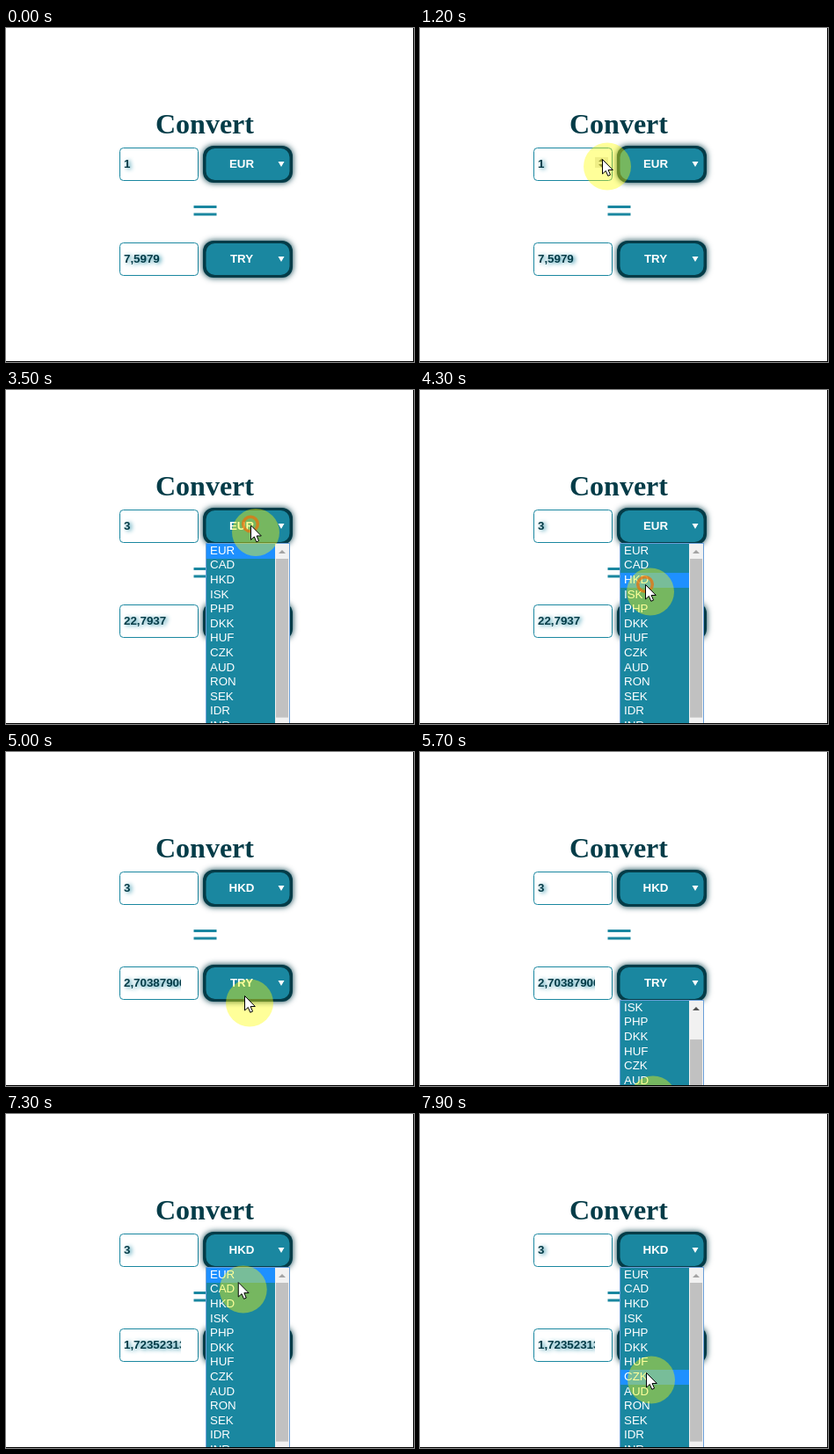
Animation of 464x380 px, one loop 8 s. Source, as an HTML page with a canvas:

```html
<!DOCTYPE html>
<html lang="en">
<head>
<meta charset="utf-8">
<title>Convert</title>
<style>
html, body { margin: 0; width: 100%; height: 100%; overflow: hidden; background: #fff; }
canvas { display: block; }
</style>
</head>
<body>
<canvas id="stage" width="464" height="380"></canvas>
<script>
const ctx = document.getElementById('stage').getContext('2d');
const LOOP = 8000, STEP = 100, ROW = 16.6, VISIBLE = 20;
const TEAL = '#1a87a0', DARK = '#043c48';
const SANS = '"Liberation Sans", Arial, sans-serif';
const SERIF = '"Liberation Serif", "Times New Roman", serif';
const CODES = ('EUR CAD HKD ISK PHP DKK HUF CZK AUD RON SEK IDR INR BRL RUB HRK JPY ' +
  'THB CHF SGD PLN BGN TRY CNY NOK NZD ZAR USD MXN ILS GBP KRW MYR').split(' ');

// Pointer hotspot: [time, x, y]
const PATH = [
  [100, 239, 225], [200, 239, 225], [500, 282, 295], [900, 199, 161], [1100, 207, 149],
  [2500, 207, 149], [2700, 206, 168], [2800, 207, 158], [2900, 207, 158],
  [3100, 265, 118], [3300, 278, 152], [3600, 278, 154], [4100, 256, 221],
  [4400, 256, 221], [5000, 271, 277], [5300, 271, 277], [5700, 259, 387],
  [6100, 259, 387], [6600, 278, 118], [6700, 278, 147], [7000, 278, 147],
  [7500, 256, 215], [7700, 257, 231], [7800, 257, 301], [7900, 257, 294]
];
const CLICKS = [1600, 2100, 2500, 2900, 3400, 4200, 5100, 6000, 6700];

// Values that change at set times: [time, value]
const AMOUNT = [[0, '1'], [1600, '2'], [2100, '3'], [2500, '4'], [2900, '3']];
const RESULT = [[0, '7,5979'], [1600, '15,1958'], [2100, '22,7937'], [2500, '30,3916'],
  [2900, '22,7937'], [4500, '2,70387906'], [6200, '1,72352313']];
const FROM = [[0, 'EUR'], [4400, 'HKD']];
const TO = [[0, 'TRY'], [6100, 'RON']];

const at = (steps, t) => steps.filter(s => s[0] <= t).pop()[1];
const within = (t, a, b) => t >= a && t < b;

function pointer(t) {
  const i = PATH.findIndex(p => p[0] > t);
  if (i < 0) return PATH[PATH.length - 1].slice(1);
  if (i === 0) return PATH[0].slice(1);
  const [t0, x0, y0] = PATH[i - 1], [t1, x1, y1] = PATH[i];
  const u = (t - t0) / (t1 - t0), k = u * u * (3 - 2 * u);
  return [x0 + (x1 - x0) * k, y0 + (y1 - y0) * k];
}

function rect(x, y, w, h, color) {
  ctx.fillStyle = color;
  ctx.fillRect(x, y, w, h);
}

function rounded(x, y, w, h, r) {
  ctx.beginPath();
  ctx.roundRect(x, y, w, h, r);
}

function polygon(points, color) {
  ctx.beginPath();
  points.forEach(([x, y]) => ctx.lineTo(x, y));
  ctx.closePath();
  ctx.fillStyle = color;
  ctx.fill();
}

function text(s, x, y, font, color, align = 'left') {
  ctx.font = font;
  ctx.fillStyle = color;
  ctx.textAlign = align;
  ctx.fillText(s, x, y);
}

function field(y, value, focused, caret) {
  rounded(129.5, y + .5, 89, 37, 4);
  ctx.lineWidth = 1;
  ctx.strokeStyle = TEAL;
  ctx.stroke();
  if (focused) {
    rounded(129, y, 90, 38, 3);
    ctx.lineWidth = 2;
    ctx.strokeStyle = 'rgba(60,140,230,.75)';
    ctx.stroke();
  }
  const font = 'bold 13.333px ' + SANS;
  ctx.save();
  ctx.beginPath();
  ctx.rect(130, y + 1, 69, 36);
  ctx.clip();
  ctx.shadowColor = TEAL;
  ctx.shadowBlur = 5;
  ctx.shadowOffsetX = 2;
  ctx.shadowOffsetY = 1;
  text(value, 134, y + 23, font, DARK);
  ctx.restore();
  if (caret) rect(141, y + 11, 1, 15, '#000');
}

function spinner() {
  rect(199, 147, 15, 12, '#e4e2de');
  polygon([[203, 152], [206.5, 148.5], [210, 152]], '#505050');
  polygon([[203, 155], [206.5, 158.5], [210, 155]], '#505050');
}

function select(y, code) {
  ctx.save();
  ctx.shadowColor = DARK;
  ctx.shadowBlur = 7;
  rounded(224, y - 3, 102, 42, 12);
  ctx.fillStyle = DARK;
  ctx.fill();
  ctx.restore();
  rounded(227.5, y, 95, 36, 10);
  ctx.fillStyle = TEAL;
  ctx.fill();
  text(code, 268, y + 22, 'bold 13.333px ' + SANS, '#fff', 'center');
  polygon([[309.5, y + 15], [316.5, y + 15], [313, y + 21]], '#fff');
}

function list(y, first, chosen, [px, py]) {
  const height = VISIBLE * ROW, top = y + .8;
  const hovering = py > top && px > 227 && px < 306;
  const active = hovering ? first + Math.floor((py - top) / ROW) : CODES.indexOf(chosen);
  rect(227, y, 96, height + 2, '#6a9fd8');
  rect(228, y + 1, 78, height, TEAL);
  for (let i = 0; i < VISIBLE; i++) {
    const rowTop = Math.round(top + i * ROW);
    if (first + i === active) rect(228, rowTop, 78, 17, '#1e90ff');
    text(CODES[first + i], 232, rowTop + 12, '13.333px ' + SANS, '#fff');
  }
  const track = height - 34, unit = track / CODES.length;
  rect(306, y + 1, 16, height, '#f1f1f1');
  rect(307, y + 18 + first * unit, 14, VISIBLE * unit, '#c1c1c1');
  polygon([[310, y + 12], [314, y + 8], [318, y + 12]], first ? '#505050' : '#a3a3a3');
}

function arrow(x, y) {
  ctx.beginPath();
  [[0, 0], [0, 16.5], [3.8, 13], [6.3, 18.8], [9, 17.6], [6.6, 12], [11.8, 12]]
    .forEach(([dx, dy]) => ctx.lineTo(x + dx + .5, y + dy + .5));
  ctx.closePath();
  ctx.fillStyle = '#fff';
  ctx.fill();
  ctx.lineWidth = 1;
  ctx.strokeStyle = '#000';
  ctx.stroke();
}

function beam(x, y) {
  x = Math.round(x);
  y = Math.round(y);
  rect(x, y - 7, 1, 15, '#000');
  for (const dy of [-8, 8]) {
    rect(x - 3, y + dy, 3, 1, '#000');
    rect(x + 1, y + dy, 3, 1, '#000');
  }
}

function ring(t) {
  const start = CLICKS.find(c => within(t, c, c + 300));
  if (start === undefined) return;
  const age = (t - start) / 100, [x, y] = pointer(start);
  ctx.save();
  ctx.globalAlpha = 1 - age * .25;
  ctx.beginPath();
  ctx.arc(x, y, 9.5 - age * 1.2, 0, 2 * Math.PI);
  ctx.lineWidth = 3.5;
  ctx.strokeStyle = age < 2 ? '#e8720c' : '#b88030';
  ctx.stroke();
  ctx.restore();
}

function draw(t) {
  const tip = pointer(t), [x, y] = tip;
  const overField = x > 129 && x < 219 && y > 136 && y < 174;
  const isBeam = overField && !(x >= 199 && y >= 147 && y < 160);
  const focused = within(t, 1600, 3400);

  rect(0, 0, 464, 380, '#fff');
  text('Convert', 170, 120, 'bold 32px ' + SERIF, DARK);
  field(136, at(AMOUNT, t), focused, focused && t % 1000 >= 500);
  if (t > 0 && overField) spinner();
  select(137, at(FROM, t));
  rect(213.5, 202, 26, 3, TEAL);
  rect(213.5, 210.5, 26, 3, TEAL);
  field(244, at(RESULT, t), false, false);
  select(245, at(TO, t));

  if (within(t, 3500, 4400) || t >= 6900) list(174, 0, at(FROM, t), tip);
  if (within(t, 5200, 6100)) list(282, 3, at(TO, t), tip);

  if (t >= 100) {
    ctx.beginPath();
    ctx.arc(x + (isBeam ? 0 : 6), y + (isBeam ? 0 : 8.5), 27, 0, 2 * Math.PI);
    ctx.fillStyle = 'rgba(255,255,0,.4)';
    ctx.fill();
    ring(t);
    (isBeam ? beam : arrow)(x, y);
  }
  rect(463, 0, 1, 380, '#000');
  rect(0, 379, 464, 1, '#000');
}

const begin = performance.now();
function tick() {
  const t = (performance.now() - begin) % LOOP;
  draw(Math.floor(t / STEP) * STEP);
  requestAnimationFrame(tick);
}
tick();
</script>
</body>
</html>
```
